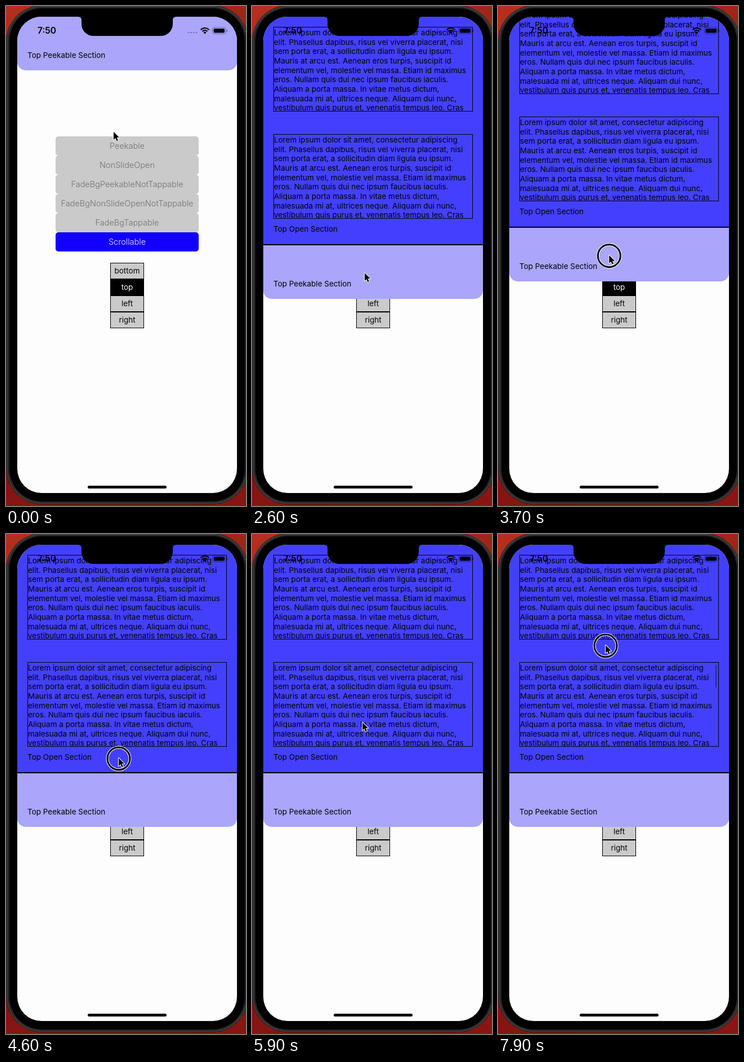
An HTML page with a canvas for the animation above (8000 ms loop, 426 by 886 pixels).

```html
<!DOCTYPE html>
<html lang="en">
<head>
<meta charset="utf-8">
<title>Top peekable section</title>
<style>
html, body { margin: 0; width: 100%; height: 100%; overflow: hidden; background: #000; }
canvas { display: block; width: 426px; height: 886px; }
</style>
</head>
<body>
<canvas id="stage" width="426" height="886"></canvas>
<script>
const ctx = document.getElementById('stage').getContext('2d');
const LOOP = 8000, STEP = 100;
const LINE = 16.7;
const FONT = '13.5px Inter, "Liberation Sans", sans-serif';
const LIGHT_FONT = '300 14.5px Inter, "Liberation Sans", sans-serif';
const TIME_FONT = '600 15.5px Inter, "Liberation Sans", sans-serif';
const BLUE = '#4340fd', LILAC = '#a9a6fc', GREY = '#cacaca';

const LOREM = [
  'Lorem ipsum dolor sit amet, consectetur adipiscing',
  'elit. Phasellus dapibus, risus vel viverra placerat, nisi',
  'sem porta erat, a sollicitudin diam ligula eu ipsum.',
  'Mauris at arcu est. Aenean eros turpis, suscipit id',
  'elementum vel, molestie vel massa. Etiam id maximus',
  'eros. Nullam quis dui nec ipsum faucibus iaculis.',
  'Aliquam a porta massa. In vitae metus dictum,',
  'malesuada mi at, ultrices neque. Aliquam dui nunc,',
  'vestibulum quis purus et, venenatis tempus leo. Cras',
  'pretium fringilla tortor eget malesuada. Quisque sem',
  'quam, dictum non est in, blandit porta elit. Ut nec',
  'sollicitudin arcu. Etiam varius, tortor at porta',
  'dignissim, ligula metus eleifend nisl, ac fringilla est',
  'massa vel nulla. Sed vitae justo at lorem porta'
];
const OPTIONS = ['Peekable', 'NonSlideOpen', 'FadeBgPeekableNotTappable',
  'FadeBgNonSlideOpenNotTappable', 'FadeBgTappable', 'Scrollable'];
const SIDES = ['bottom', 'top', 'left', 'right'];

// Keys: time, then values
const POINTER = [
  [0, 191, 224], [900, 205, 94], [1000, 207, 94], [1500, 213, 185],
  [1800, 212, 200], [2600, 200, 474], [2800, 200, 474], [3200, 197, 406],
  [3400, 196, 385], [3900, 198, 474], [4400, 200, 398], [4600, 200, 398],
  [5200, 198, 443], [5400, 198, 455], [5500, 198, 455], [6000, 196, 321],
  [6100, 196, 321], [6700, 194, 248], [6900, 194, 240], [7300, 193, 335],
  [7400, 193, 335], [7800, 191, 198], [8000, 191, 198]
];
const PANEL = [
  [0, 114], [1000, 114], [1500, 206], [2000, 519], [2800, 519], [3200, 451],
  [3400, 430], [3900, 519], [4600, 519], [5200, 554.5], [5400, 561],
  [5500, 561], [5800, 519], [8000, 519]
];
const SCROLL = [[0, 0], [6100, 0], [6700, 72], [6900, 81], [7300, 0], [8000, 0]];
const PRESSES = [[1000, 1500], [2700, 4000], [4500, 5500], [6000, 7400], [7700, 8000]];

function at(keys, t) {
  const i = keys.findIndex((k, n) => n > 0 && t <= k[0]);
  const a = keys[i - 1], b = keys[i];
  const u = (t - a[0]) / (b[0] - a[0]);
  const e = u * u * (3 - 2 * u);
  return a.slice(1).map((v, n) => v + (b[n + 1] - v) * e);
}

function rect(x, y, w, h, color) {
  ctx.fillStyle = color;
  ctx.fillRect(x, y, w, h);
}

function round(x, y, w, h, r, color) {
  ctx.beginPath();
  ctx.roundRect(x, y, w, h, r);
  ctx.fillStyle = color;
  ctx.fill();
}

function frame(x, y, w, h) {
  ctx.strokeStyle = '#000';
  ctx.lineWidth = 1;
  ctx.strokeRect(x + 0.5, y + 0.5, w - 1, h - 1);
}

// y is the middle of the capital letters
function text(str, x, y, font = FONT, color = '#000', align = 'left') {
  ctx.font = font;
  ctx.fillStyle = color;
  ctx.textAlign = align;
  ctx.fillText(str, x, y + 4.8);
}

function drawBody() {
  const glow = ctx.createLinearGradient(0, 0, 426, 886);
  glow.addColorStop(0, '#b5301c');
  glow.addColorStop(0.5, '#7c1712');
  glow.addColorStop(1, '#8a1512');
  rect(0, 0, 426, 886, glow);
  round(0, -1, 430, 884, 64, '#1c1c1c');
  round(1, 0, 428, 882, 63, '#454545');
  round(2.5, 1.5, 425, 879, 62, '#262626');
  round(6, 4, 418, 874, 58, '#000');
}

function drawControls() {
  OPTIONS.forEach((name, i) => {
    const on = i === 5, y = 231 + 34 * i;
    round(88, y, 254, 34, 5, on ? '#1200ff' : GREY);
    text(name, 215, y + 17, LIGHT_FONT, on ? '#f0f0ff' : '#707070', 'center');
  });
  SIDES.forEach((name, i) => {
    const on = i === 1, y = 455 + 29 * i;
    rect(185, y, 60, 29, on ? '#000' : GREY);
    frame(185, y, 60, 29);
    text(name, 215, y + 14.5, FONT, on ? '#fff' : '#000', 'center');
  });
  rect(185, 541, 60, 2, '#000');
  rect(185, 570, 60, 1, '#000');
}

function drawTextBox(y, scroll) {
  ctx.save();
  ctx.beginPath();
  ctx.rect(38, y, 354, 149);
  ctx.clip();
  LOREM.forEach((line, i) => text(line, 39, y + 10 + LINE * i - scroll));
  ctx.restore();
  frame(38, y, 354, 150);
}

function drawPanel(bottom, scroll, t) {
  const y = Math.round(bottom);
  round(20, y - 96, 390, 96, [0, 0, 15, 15], LILAC);
  rect(20, 0, 390, y - 96, BLUE);
  rect(20, y - 97, 390, 2, '#000');
  drawTextBox(y - 482, 0);
  drawTextBox(y - 292, scroll);
  if (t >= 6100) round(386, y - 287 + scroll / 4, 2, 40, 1, '#2a2798');
  text('Top Open Section', 38, y - 124);
  text('Top Peekable Section', 38, y - 27);
}

function drawStatus() {
  text('7:50', 72.5, 44.5, TIME_FONT, '#000', 'center');
  for (let i = 0; i < 4; i++) rect(323 + i * 4.5, 46, 2.5, 2, 'rgba(0,0,0,.3)');
  ctx.strokeStyle = '#000';
  ctx.lineWidth = 2.2;
  for (const r of [6, 10]) {
    ctx.beginPath();
    ctx.arc(353, 49, r, -Math.PI * 0.76, -Math.PI * 0.24);
    ctx.stroke();
  }
  ctx.beginPath();
  ctx.moveTo(353, 49.5);
  ctx.arc(353, 49, 3.4, -Math.PI * 0.76, -Math.PI * 0.24);
  ctx.fillStyle = '#000';
  ctx.fill();
  ctx.strokeStyle = 'rgba(0,0,0,.4)';
  ctx.lineWidth = 1;
  ctx.beginPath();
  ctx.roundRect(366.5, 38, 23.5, 11.5, 3.5);
  ctx.stroke();
  round(368.5, 40, 19.5, 7.5, 2, '#000');
  round(391.5, 42, 1.5, 4, 1, 'rgba(0,0,0,.45)');
}

function drawNotch() {
  ctx.fillStyle = '#000';
  ctx.beginPath();
  ctx.moveTo(128, 18);
  ctx.lineTo(128, 19);
  ctx.quadraticCurveTo(134, 19, 134, 25);
  ctx.lineTo(134, 31);
  ctx.arcTo(134, 53, 156, 53, 21);
  ctx.lineTo(274, 53);
  ctx.arcTo(296, 53, 296, 31, 21);
  ctx.lineTo(296, 25);
  ctx.quadraticCurveTo(296, 19, 302, 19);
  ctx.lineTo(302, 18);
  ctx.fill();
}

function drawPointer(x, y, pressed) {
  if (pressed) {
    for (const [width, color] of [[5, '#fff'], [3, '#000']]) {
      ctx.beginPath();
      ctx.arc(x, y, 20, 0, Math.PI * 2);
      ctx.lineWidth = width;
      ctx.strokeStyle = color;
      ctx.stroke();
    }
  }
  const arrow = new Path2D('M0 0V14L3.2 11L5.4 16.2L7.8 15.2L5.6 10.1H10Z');
  ctx.save();
  ctx.translate(x, y - 1);
  ctx.lineJoin = 'round';
  ctx.lineWidth = 2;
  ctx.strokeStyle = '#fff';
  ctx.stroke(arrow);
  ctx.fillStyle = '#000';
  ctx.fill(arrow);
  ctx.restore();
}

function draw(t) {
  const [x, y] = at(POINTER, t);
  const [bottom] = at(PANEL, t);
  const [scroll] = at(SCROLL, t);
  drawBody();
  ctx.save();
  ctx.beginPath();
  ctx.roundRect(20, 19, 390, 844, 43);
  ctx.clip();
  rect(20, 19, 390, 844, '#fdfdfd');
  drawControls();
  drawPanel(bottom, scroll, t);
  drawStatus();
  round(145, 850, 140, 5, 2.5, '#000');
  ctx.restore();
  drawNotch();
  drawPointer(x, y, PRESSES.some(([from, to]) => t >= from && t < to));
}

const start = performance.now();
function tick() {
  const t = (performance.now() - start) % LOOP;
  draw(Math.floor(t / STEP) * STEP);
  requestAnimationFrame(tick);
}
tick();
</script>
</body>
</html>
```
